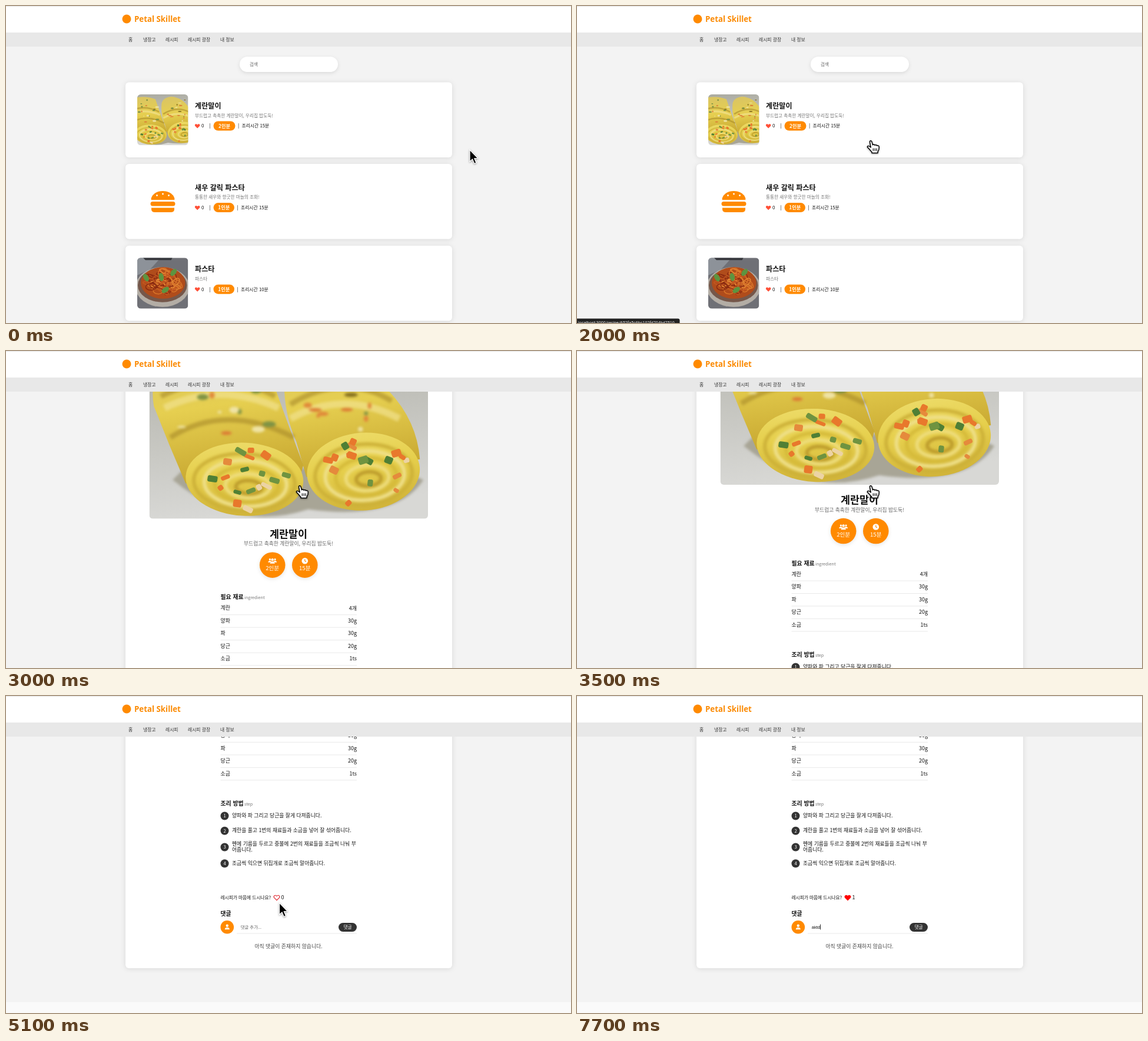
An HTML page for the animation above (8 s loop, 960x538 px).

```html
<!DOCTYPE html>
<html lang="ko">
<head>
<meta charset="utf-8">
<title>Recipes</title>
<style>
html, body { margin: 0; width: 100%; height: 100%; overflow: hidden; background: #f3f3f3; }
svg { display: block; }
#stage { width: 100%; height: 100%; }
text { font-family: "Noto Sans CJK KR", "Noto Sans CJK", "Noto Sans CJK JP", sans-serif; white-space: pre; }
.card { fill: #fff; filter: drop-shadow(0 1.5px 4px rgba(0,0,0,.11)); }
.soft { filter: drop-shadow(0 2px 3px rgba(0,0,0,.1)); }
.cursor { filter: drop-shadow(0 1.5px 1.5px rgba(0,0,0,.4)); }
.blur { filter: blur(2px); }
</style>
</head>
<body>
<svg id="stage" viewBox="0 0 960 538"></svg>
<script>
const ORANGE = '#ff8a00', DARK = '#333';
let seed = 7;
const rnd = (a = 0, b = 1) => {
  seed = (seed * 16807) % 2147483647;
  return a + (b - a) * seed / 2147483647;
};
const pick = list => list[Math.floor(rnd(0, list.length))];
const repeat = (n, fn) => Array.from({ length: n }, (_, i) => fn(i)).join('');

// y is the vertical middle of the line
const text = (x, y, size, str, { w = 400, c = '#111', a = 'start', more = '' } = {}) =>
  `<text x="${x}" y="${y + size * .37}" font-size="${size}" font-weight="${w}" fill="${c}" text-anchor="${a}" ${more}>${str}</text>`;
const rect = (x, y, w, h, fill, r = 0, more = '') =>
  `<rect x="${x}" y="${y}" width="${w}" height="${h}" rx="${r}" fill="${fill}" ${more}/>`;
const circle = (x, y, r, fill, more = '') => `<circle cx="${x}" cy="${y}" r="${r}" fill="${fill}" ${more}/>`;
const ellipse = (x, y, rx, ry, fill, more = '') =>
  `<ellipse cx="${x}" cy="${y}" rx="${rx}" ry="${ry}" fill="${fill}" ${more}/>`;
const path = (d, fill, more = '') => `<path d="${d}" fill="${fill}" ${more}/>`;
const at = (x, y, body, s = 1) => `<g transform="translate(${x} ${y}) scale(${s})">${body}</g>`;
const blur = body => `<g class="blur">${body}</g>`;
const card = (y, h) => rect(203, y, 555, h, '#fff', 6, 'class="card"');
const heart = (x, y, s, more) => at(x, y,
  path('M0 4.3L-4.3 0C-6.2 -2.4 -3 -6 0 -2.6C3 -6 6.2 -2.4 4.3 0Z', 'none', more), s);

// Photos
function rollFace(cx, cy, rx, ry, tilt) {
  const rings = ['#cdb138', '#efe08a', '#d6bb3a', '#eedd7c', '#bd9c2c'];
  return `<g transform="rotate(${tilt} ${cx} ${cy})">` +
    ellipse(cx, cy, rx, ry, 'url(#face)') +
    blur(repeat(5, i => ellipse(cx + i * 2, cy + 5 + i * 2, rx * (.86 - i * .16), ry * (.78 - i * .15), 'none', `stroke="${rings[i]}" stroke-width="6"`))) +
    repeat(18, () => {
      const a = rnd(0, 6.28), d = rnd(.25, .85);
      return at(cx + Math.cos(a) * rx * d, cy + Math.sin(a) * ry * d,
        `<g transform="rotate(${rnd(-40, 40)})">${rect(-8, -4, rnd(9, 20), rnd(6, 13), pick(['#e8782c', '#e58a3c', '#6f9340', '#4f7f35', '#ecd3a4']), 3)}</g>`);
    }) + '</g>';
}
const LEFT = 'M62 256L34 190L8 125Q-2 70 40 28Q120 2 192 30Q215 100 262 225L255 250Z';
const RIGHT = 'M267 245L250 185Q225 130 230 60Q235 20 290 14Q370 20 408 100Q455 150 460 215Z';
const eggPhoto = rect(0, 0, 474, 316, 'url(#plate)') +
  blur(path('M40 250Q150 340 270 300Q420 320 466 250L420 230H60Z', '#a8a596')) +
  path(RIGHT, 'url(#egg)') + path(LEFT, 'url(#egg)') +
  blur(path('M20 108Q120 58 214 108M36 178Q130 118 246 178M240 122Q330 66 412 116', 'none', 'stroke="#a98a2a" stroke-width="9" opacity=".6"') +
    path('M26 128Q120 82 220 128M240 146Q330 96 425 146', 'none', 'stroke="#f1e18e" stroke-width="12" opacity=".7"') +
    repeat(34, i => {
      const y = rnd(35, 175), x = i % 2 ? rnd(35, 205) : rnd(250, 385);
      return ellipse(x, y, rnd(3, 12), rnd(2, 6), pick(['#e0893a', '#dc7a34', '#7f9344', '#86701f', '#efe3a4']));
    })) +
  rollFace(162, 249, 100, 62, 3) + rollFace(364, 236, 96, 66, -4);

const pastaPhoto = rect(0, 0, 87, 87, '#6f7076') +
  path('M0 0H40L22 20L0 30Z', '#8d9299') + path('M10 0H60L58 4H14Z', '#35363b') +
  ellipse(43, 50, 46, 34, '#b3ada5') + ellipse(43, 47, 42, 29, '#75574a') + ellipse(44, 43, 38, 27, '#b04c1b') +
  repeat(46, () => {
    const a = rnd(0, 6.28), d = Math.sqrt(rnd()), x = 44 + Math.cos(a) * 28 * d, y = 43 + Math.sin(a) * 20 * d;
    return ellipse(x, y, rnd(5, 10), rnd(2, 6), 'none',
      `transform="rotate(${rnd(-50, 50)} ${x} ${y})" stroke="${pick(['#d9752a', '#e58a35', '#c4571f', '#8a2a10'])}" stroke-width="1.5"`);
  }) +
  [[15, 34, 60], [41, 33, 80], [62, 25, -50], [48, 55, -35]]
    .map(([x, y, r]) => ellipse(x, y, 7, 4.2, '#5d9440', `transform="rotate(${r} ${x} ${y})"`)).join('');

const framed = (id, x, y, w, h, box, body) =>
  `<clipPath id="${id}">${rect(x, y, w, h, '#000', 6)}</clipPath><g clip-path="url(#${id})">` +
  `<svg x="${x}" y="${y}" width="${w}" height="${h}" viewBox="${box}" preserveAspectRatio="xMidYMid slice">${body}</svg></g>`;

const burger = path('M247 329Q245.5 327 249 321.5Q255 314 266.5 314Q278 314 284 321.5Q287.5 327 286 329Z', ORANGE) +
  circle(256.5, 321.5, 1.4, '#fff') + circle(266.5, 319, 1.4, '#fff') + circle(276.5, 321.5, 1.4, '#fff') +
  rect(245.5, 332, 42, 7.5, ORANGE, 3.7) +
  path('M247 342.5H286V345Q286 350 280 350H253Q247 350 247 345Z', ORANGE);

// List page
function recipe(i, title, note, people, time, picture) {
  const y = 129.5 + i * 138.6, m = y + 74, w = people === 2 ? 37 : 35.5;
  return card(y, 127.5) + picture(y + 20.5) +
    text(321, y + 40, 12.1, title, { w: 700 }) +
    text(321, y + 56.5, 7.65, note, { w: 300, c: '#777' }) +
    heart(325.2, m + .3, .88, 'style="fill:#ff5038"') + text(332, m, 8, '0') +
    text(346.5, m, 8, '|', { a: 'middle' }) +
    rect(352.5, m - 8, w, 16, ORANGE, 8) +
    text(352.5 + w / 2, m, 8.2, people + '인분', { w: 700, c: '#fff', a: 'middle' }) +
    text(358 + w, m, 8, '|', { a: 'middle' }) +
    text(363.5 + w, m, 7.8, `조리시간 ${time}분`);
}
const listPage = rect(397, 86, 167, 26, '#fff', 13, 'class="soft"') +
  text(414, 99, 7.6, '검색', { c: '#666' }) +
  recipe(0, '계란말이', '부드럽고 촉촉한 계란말이, 우리집 밥도둑!', 2, 15,
    y => framed('thumb1', 223, y, 86.5, 86.5, '0 0 474 316', eggPhoto)) +
  recipe(1, '새우 갈릭 파스타', '통통한 새우와 향긋한 마늘의 조화!', 1, 15, () => burger) +
  recipe(2, '파스타', '파스타', 1, 10,
    y => framed('thumb2', 223, y, 86.5, 86.5, '0 0 87 87', pastaPhoto));

// Detail page
const person = (s, fill = '#fff') => circle(0, -2.6 * s, 2.2 * s, fill) +
  path(`M${-4 * s} ${4 * s}Q${-4 * s} ${.4 * s} 0 ${.4 * s}Q${4 * s} ${.4 * s} ${4 * s} ${4 * s}Z`, fill);
const badge = (x, label, icon) => circle(x, 520.5, 21.8, ORANGE, 'class="soft"') + at(x, 513.5, icon) +
  text(x, 526, 9.6, label, { w: 500, c: '#fff', a: 'middle' });
const heading = (y, ko, en) => text(364.5, y, 9.9, ko, { w: 700 }) +
  text(405, y + 1, 7.2, en, { w: 300, c: '#777' });
const rule = (x, y) => rect(x, y - .5, 596 - x, 1, '#e9e9e9');
const items = [['계란', '4개'], ['양파', '30g'], ['파', '30g'], ['당근', '20g'], ['소금', '1ts']];
const steps = [
  [751.5, '양파와 파 그리고 당근을 잘게 다져줍니다.'],
  [776.7, '계란을 풀고 1번의 재료들과 소금을 넣어 잘 섞어줍니다.'],
  [804.5, '펜에 기름을 두르고 중불에 2번의 재료들을 조금씩 나눠 부', '어줍니다.'],
  [832.2, '조금씩 익으면 뒤집개로 조금씩 말아줍니다.']
];
const detailPage = card(86, 924) +
  framed('hero', 243.5, 126, 473.5, 316, '0 0 474 316', eggPhoto) +
  text(480, 467.5, 17.4, '계란말이', { w: 700, a: 'middle' }) +
  text(480, 484.5, 8.75, '부드럽고 촉촉한 계란말이, 우리집 밥도둑!', { w: 300, c: '#666', a: 'middle' }) +
  badge(452.7, '2인분', at(-4.3, -.5, person(.75)) + at(4.3, -.5, person(.75)) + at(0, .6, person(1, ORANGE), 1.25) + at(0, .6, person(1))) +
  badge(507.8, '15분', circle(0, 0, 5.3, '#fff') + path('M0 -3V0L2 1.5', 'none', `stroke="${ORANGE}" stroke-width="1.2"`)) +
  heading(575, '필요 재료', 'ingredient') +
  items.map(([name, amount], i) => {
    const y = 593.5 + i * 21.45;
    return text(364.5, y, 8.9, name) + text(596, y, 9, amount, { a: 'end' }) + rule(364.5, y + 11.5);
  }).join('') +
  heading(730, '조리 방법', 'step') +
  steps.map(([y, ...lines], i) => circle(371.5, y, 7, DARK) +
    text(371.5, y, 7.6, i + 1, { c: '#fff', w: 500, a: 'middle' }) +
    lines.map((line, k) => text(384, y - .6 + (lines.length > 1 ? k * 9.4 - 4.7 : 0), 8.8, line)).join('')).join('') +
  text(364.5, 890, 7.7, '레시피가 마음에 드시나요?') +
  heart(460, 890.3, 1, 'id="like" stroke-width="1.1"') +
  text(467.5, 890, 9, '0', { more: 'id="count"' }) +
  text(364.5, 917, 9.8, '댓글', { w: 700 }) +
  circle(375.8, 940.3, 11.3, ORANGE) + at(375.8, 940.3, person(1)) +
  text(398.7, 940, 7.4, '댓글 추가...', { c: '#666', more: 'id="hint"' }) +
  text(398.7, 940, 7.6, '', { more: 'id="typed" style="font-family:\'Liberation Sans\',Arial,sans-serif"' }) +
  rect(398.7, 935.5, .8, 9, '#000', 0, 'id="caret"') +
  rule(392, 951) + rect(565, 933, 31, 15, DARK, 7.5) +
  text(580.5, 940.4, 7.7, '댓글', { w: 500, c: '#fff', a: 'middle' }) +
  text(480, 972.7, 8.8, '아직 댓글이 존재하지 않습니다.', { c: '#444', a: 'middle' }) +
  rect(0, 1067.5, 960, 20, '#fafafa');

const header = rect(0, 0, 960, 45, '#fff') + rect(0, 0, 960, 1, '#e4e4e4') + rect(0, 45, 960, 24, '#e8e8e8') +
  circle(205, 22, 7.5, ORANGE) +
  text(218, 22, 13.3, 'Petal Skillet', { w: 600, c: '#fb8b05', more: 'style="font-family:\'Noto Sans\',sans-serif"' }) +
  [[208, '홈'], [233, '냉장고'], [271, '레시피'], [309, '레시피 광장'], [364, '내 정보']]
    .map(([x, label]) => text(x, 56.8, 7.8, label, { c: DARK })).join('');

const status = rect(-4, 530.5, 178.5, 14, '#222', 3) +
  text(2, 537, 7.1, 'localhost:3000/recipe/652fa5c6bc102fd704bd7510', { c: '#eee', more: 'style="font-family:Roboto,sans-serif"' });

// Pointers, each with its hot spot at 0,0
const pointers = {
  arrow: path('M0 0V20L4.5 16L7.7 23.5L11 22L7.9 14.8L13.7 14.3Z', '#000', 'stroke="#fff" stroke-width="1.3"'),
  hand: at(-6.5, -1.5, path('M5.6 4.2C4.8 1.6 8 .6 8.9 3.2L10.4 8.8C11.2 7.6 13.4 7.8 13.9 9.3C15 8.3 17 8.6 17.5 10C18.8 9.2 21 9.8 21.2 12C21.5 15.5 20.5 18 19.2 20L19 22.5H9.2L8.8 20.5C6.5 18.5 4.8 15.5 2 13.2C.3 11.5 2.5 9.6 4.6 11L7.2 13Z', '#fff', 'stroke="#000" stroke-width="1.5" stroke-linejoin="round"') +
    path('M11.3 14.5V19M14.3 14.5V19M17.2 14.5V19', 'none', 'stroke="#000" stroke-width="1.2"')),
  beam: path('M-2.5 -7Q0 -7 0 -5V5Q0 7 -2.5 7M2.5 -7Q0 -7 0 -5V5Q0 7 2.5 7', 'none', 'stroke="#222"')
};

const $ = id => document.getElementById(id);
const gradient = (id, ...colors) => `<linearGradient id="${id}" x2=".15" y2="1">` +
  colors.map((c, i) => `<stop offset="${i / (colors.length - 1)}" stop-color="${c}"/>`).join('') + '</linearGradient>';
$('stage').innerHTML = '<defs>' + gradient('plate', '#a9a99f', '#c2c2bc', '#d8d8d5') +
  gradient('egg', '#d8c365', '#e6cf50', '#c9a932') + gradient('face', '#eddc6a', '#e6cf4c', '#d2b53a') + '</defs>' +
  rect(0, 0, 960, 538, '#f3f3f3') +
  `<g id="list">${listPage}</g><g id="detail">${detailPage}</g>${header}<g id="status">${status}</g><g id="pointer">` +
  Object.entries(pointers).map(([id, body]) => `<g id="${id}" class="cursor">${body}</g>`).join('') + '</g>';

const clamp = v => Math.max(0, Math.min(1, v));
const smooth = p => p * p * (3 - 2 * p);
const show = (id, on) => { $(id).style.display = on ? '' : 'none'; };

// start, end, target
const moves = [
  [650, 1950, 498.5, 228.5],
  [4500, 5050, 464.5, 351],
  [5100, 5300, 461.5, 346.5],
  [5700, 6250, 537, 392]
];
function pointerAt(t) {
  let x = 788, y = 244;
  for (const [a, b, tx, ty] of moves) {
    const e = smooth(clamp((t - a) / (b - a)));
    x += (tx - x) * e;
    y += (ty - y) * e;
  }
  return [x, y];
}
const scrollAt = t => 215 * (1 - (1 - clamp((t - 2700) / 845)) ** 3) + 333 * smooth(clamp((t - 3600) / 714));

function shapeAt(t, x, y) {
  if (t < 4600) return x < 758 ? 'hand' : 'arrow';
  if (y > 383) return 'beam';
  return t >= 5200 && y < 350 ? 'hand' : 'arrow';
}

function draw(now) {
  const t = Math.floor(now % 8000 / 100) * 100;
  const onDetail = t >= 2300, liked = t >= 5500;
  show('list', !onDetail);
  show('detail', onDetail);
  show('status', t >= 1600 && t < 2500);
  $('detail').setAttribute('transform', `translate(0 ${-scrollAt(t)})`);

  const like = $('like');
  like.setAttribute('fill', liked ? '#f00' : 'none');
  like.setAttribute('stroke', liked ? '#f00' : '#e0202a');
  $('count').textContent = liked ? 1 : 0;

  const keys = [7200, 7300, 7400, 7700].filter(k => t >= k).length;
  const typed = $('typed');
  typed.textContent = 'aktd'.slice(0, keys);
  show('hint', !keys);
  show('caret', keys || (t >= 6300 && t < 6700));
  $('caret').setAttribute('x', 398.7 + (keys ? typed.getComputedTextLength() : 0));

  const [x, y] = pointerAt(t), shape = shapeAt(t, x, y);
  show('pointer', !keys);
  $('pointer').setAttribute('transform', `translate(${x} ${y})`);
  for (const id in pointers) show(id, id === shape);
}

const start = performance.now();
(function frame() {
  draw(performance.now() - start);
  requestAnimationFrame(frame);
})();
</script>
</body>
</html>
```
